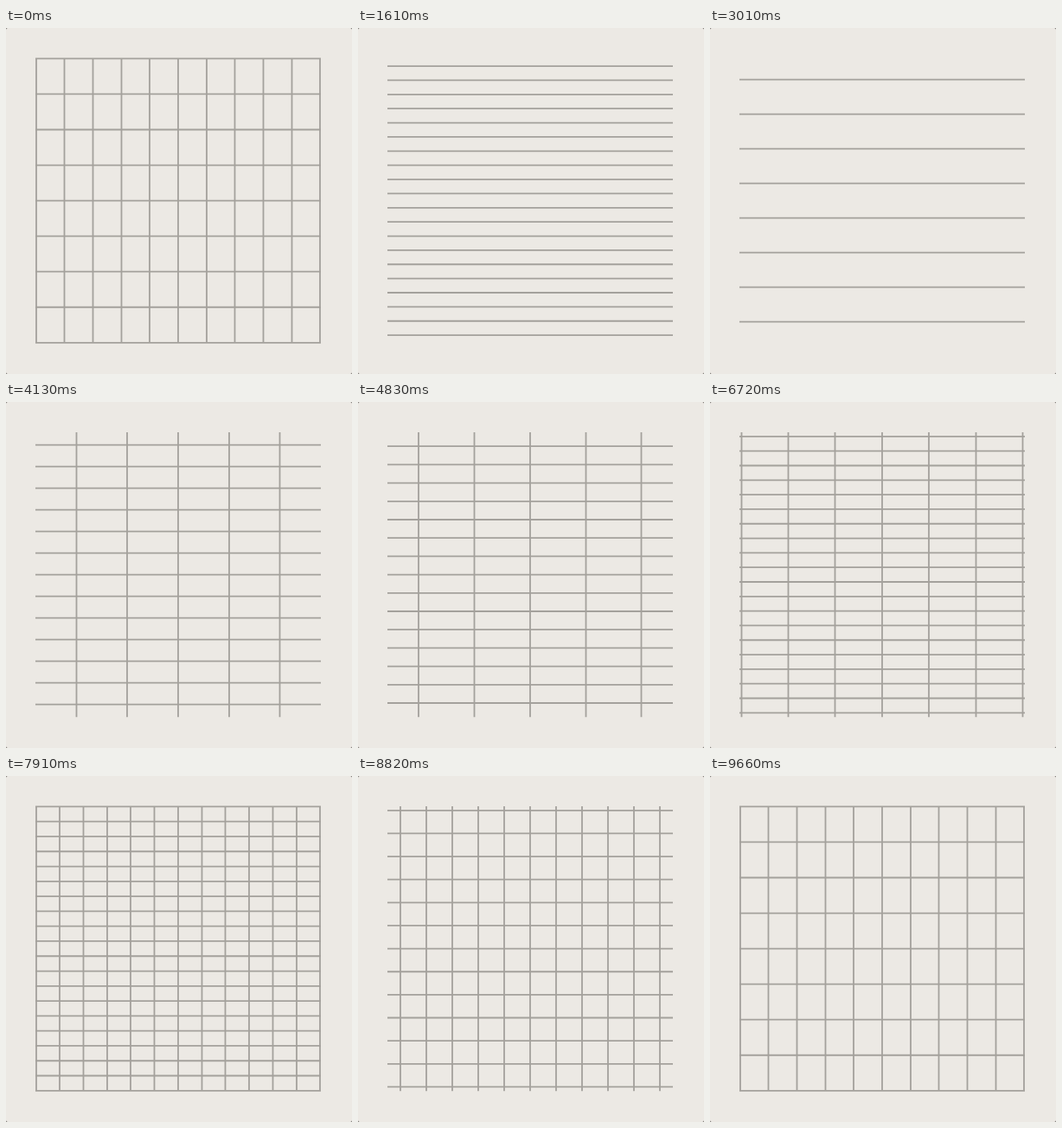
Write an HTML page with a canvas that moves like this. It is 400 px wide and 400 px high and loops after 9.73 s.

```html
<!DOCTYPE html>
<html lang="en">
<head>
<meta charset="utf-8">
<title>Grid rhythm</title>
<style>
html, body { margin: 0; width: 100%; height: 100%; overflow: hidden; background: #55534f; }
canvas { display: block; width: 400px; height: 400px; }
</style>
</head>
<body>
<canvas id="stage" width="400" height="400"></canvas>
<script>
const ctx = document.getElementById("stage").getContext("2d");
const LOOP = 9730, TICK = 70, HOLD = 280;
const SIZE = 328.4, CX = 199.2, CY = 199.6;

// rows and cols count the cells across the box;
// shift 0 centres a row line, 0.5 centres a row cell.
const poses = [
  { at: 0, rows: 8, cols: 10, shift: 0 },
  { at: 1610, rows: 20.06, cols: 1, shift: 0.5 },
  { at: 3010, rows: 8.21, cols: 1, shift: 0.5 },
  { at: 3850, rows: 13.14, cols: 5.585, shift: 0 },
  { at: 5740, rows: 19.78, cols: 4.456, shift: 0 },
  { at: 7910, rows: 19, cols: 12, shift: 0.5 },
  { at: 9450, rows: 8, cols: 10, shift: 0 }
];

const zoom = (a, b, k) => a * Math.pow(b / a, k);

// Rest on each pose, then ease to the next one.
function poseAt(t) {
  const i = poses.findLastIndex(p => p.at <= t);
  const a = poses[i], b = poses[i + 1];
  if (!b || t <= a.at + HOLD) return a;
  const u = (t - a.at - HOLD) / (b.at - a.at - HOLD);
  const k = u * u * (3 - 2 * u);
  return { rows: zoom(a.rows, b.rows, k), cols: zoom(a.cols, b.cols, k), shift: b.shift };
}

// Lines spread out from the centre until they leave the box.
function offsets(cells, shift) {
  const list = [];
  if (cells < 2) return list;
  const reach = Math.ceil(cells / 2) + 1;
  for (let i = -reach; i <= reach; i++) {
    const d = (i + shift) * SIZE / cells;
    if (Math.abs(d) <= SIZE / 2 + 0.1) list.push(d);
  }
  return list;
}

function draw(t) {
  const pose = poseAt(t);
  ctx.clearRect(0, 0, 400, 400);
  ctx.fillStyle = "#ece9e4";
  ctx.beginPath();
  ctx.roundRect(0, 0, 400, 400, 2);
  ctx.fill();

  ctx.strokeStyle = "#a4a19c";
  ctx.lineWidth = 1.8;
  ctx.beginPath();
  for (const d of offsets(pose.rows, pose.shift)) {
    ctx.moveTo(34, CY + d);
    ctx.lineTo(364, CY + d);
  }
  for (const d of offsets(pose.cols, 0)) {
    const x = Math.floor((CX + d) * 2) / 2;
    ctx.moveTo(x, 35);
    ctx.lineTo(x, 364.3);
  }
  ctx.stroke();
}

const start = performance.now();
function frame() {
  const t = (performance.now() - start) % LOOP;
  draw(Math.floor(t / TICK) * TICK);
  requestAnimationFrame(frame);
}
frame();
</script>
</body>
</html>
```
